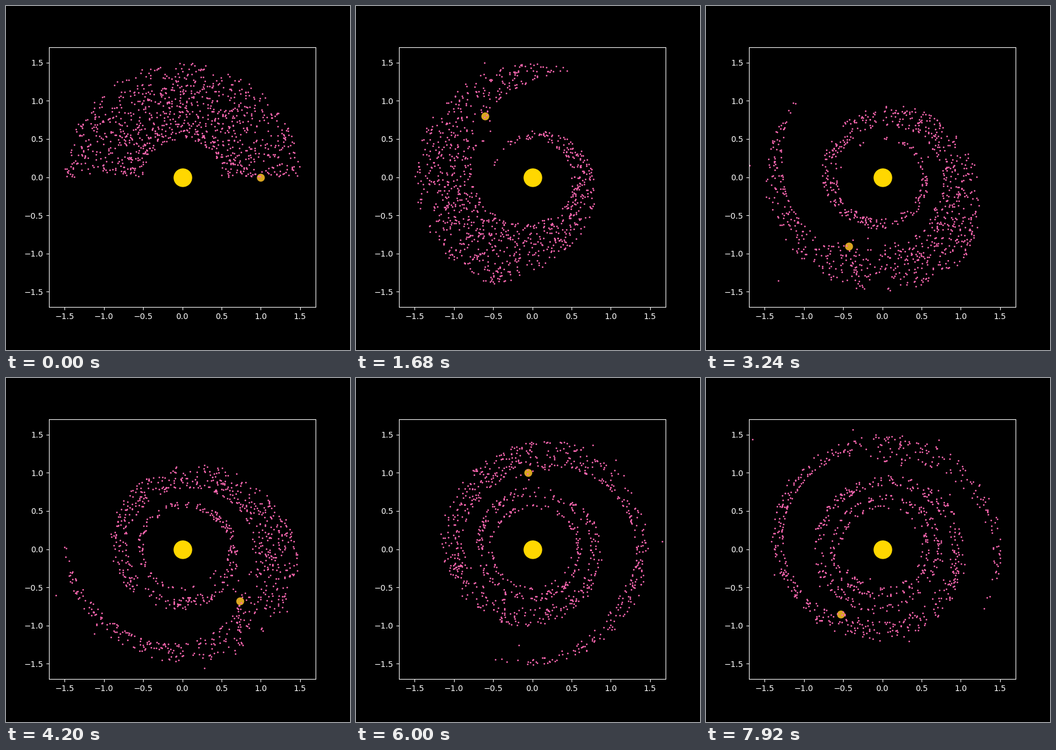
Animation of 600x600 px, one loop 8 s. Source, as a matplotlib script:

```python
import numpy as np
import matplotlib.pyplot as plt
from matplotlib.animation import FuncAnimation

STEPS = 67          # simulated poses, each held for HOLD animation frames
HOLD = 3
INTERVAL = 40       # ms
FRAMES = 200
STEP_ANGLE = 0.15814  # planet's advance per pose, radians
SUBSTEPS = 16
PLANET_MASS = 0.001
COUNT = 1000


def planet_at(t):
    return np.array([np.cos(t), np.sin(t)])


def pull(pos, center, mass):
    d = center[:, None] - pos
    return mass * d / (d ** 2).sum(axis=0) ** 1.5


def acceleration(pos, t):
    return pull(pos, np.zeros(2), 1.0) + pull(pos, planet_at(t), PLANET_MASS)


def simulate():
    """Half a disc of test particles on circular orbits, stirred by the planet."""
    rng = np.random.default_rng(4)
    r = rng.uniform(0.5, 1.5, COUNT)
    phi = rng.uniform(0, np.pi, COUNT)
    pos = r * np.array([np.cos(phi), np.sin(phi)])
    vel = np.array([-np.sin(phi), np.cos(phi)]) / np.sqrt(r)

    dt = STEP_ANGLE / SUBSTEPS
    t = 0.0
    acc = acceleration(pos, t)
    poses = [pos.copy()]
    for _ in range(STEPS - 1):
        for _ in range(SUBSTEPS):
            vel += acc * dt / 2
            pos += vel * dt
            t += dt
            acc = acceleration(pos, t)
            vel += acc * dt / 2
        poses.append(pos.copy())
    return poses


poses = simulate()

plt.style.use("dark_background")
plt.rcParams["font.family"] = "DejaVu Sans"
fig, ax = plt.subplots(figsize=(6, 6), dpi=100)
fig.subplots_adjust(left=0.125, right=0.9, bottom=0.125, top=0.88)
ax.set_xlim(-1.7, 1.7)
ax.set_ylim(-1.7, 1.7)

ax.scatter([0], [0], s=500, color="gold")
planet = ax.scatter([1], [0], s=80, color="goldenrod")
dust = ax.scatter(*poses[0], s=1, color="hotpink")


def draw(i):
    k = i // HOLD
    planet.set_offsets([planet_at(k * STEP_ANGLE)])
    dust.set_offsets(poses[k].T)
    return planet, dust


anim = FuncAnimation(fig, draw, frames=FRAMES, interval=INTERVAL,
                     repeat=True, repeat_delay=0)
plt.show()
```
